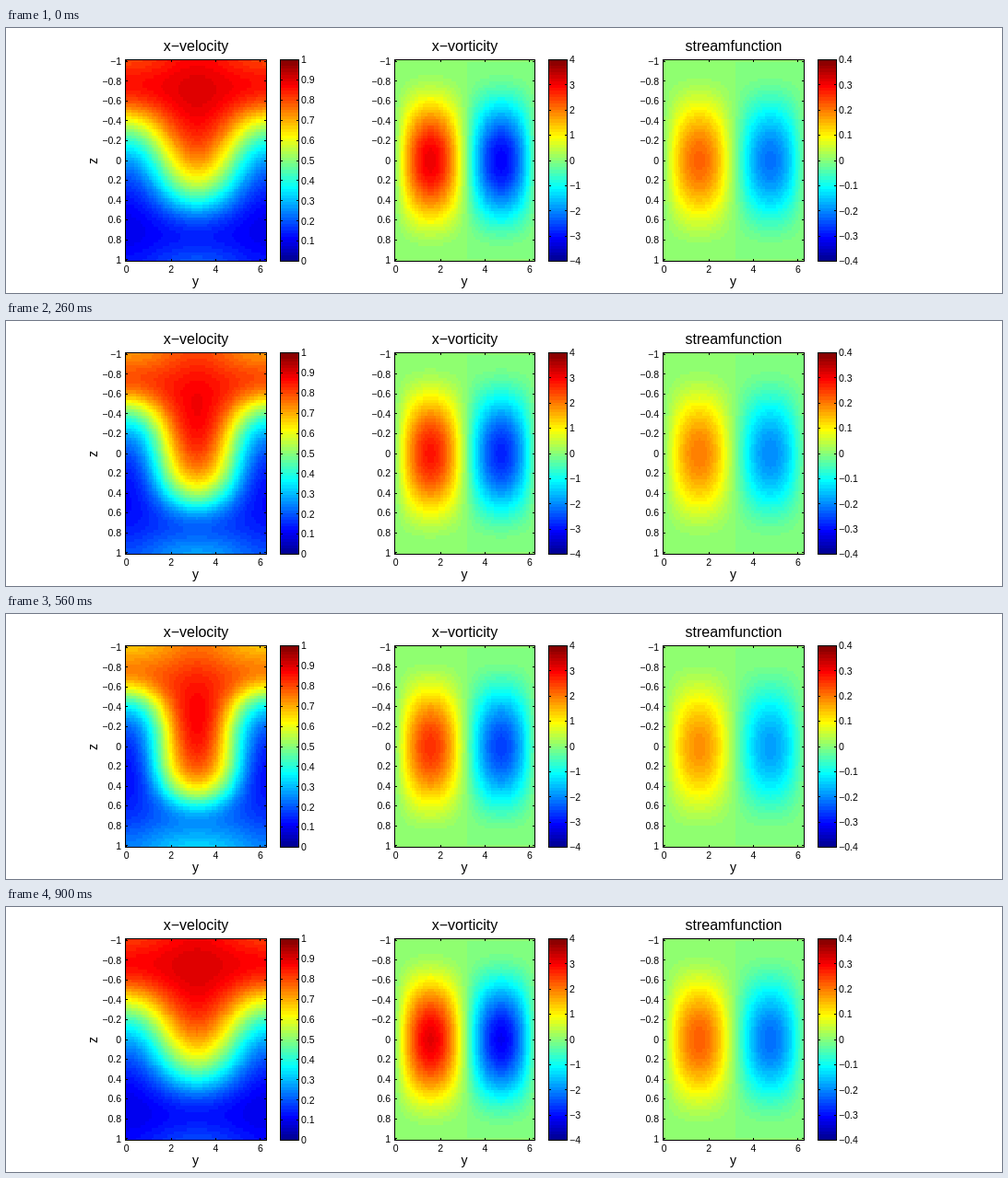
Recreate the animation shown at these times as an HTML page with a canvas. Size 1080 by 288 pixels, loop 920 ms.

```html
<!DOCTYPE html>
<html lang="en">
<head>
<meta charset="utf-8">
<title>Streamwise rolls and streaks</title>
<style>
  html, body { margin: 0; width: 100%; height: 100%; overflow: hidden; background: #fff; }
  canvas, svg { position: absolute; left: 0; top: 0; width: 1080px; height: 288px; }
  text { font-family: "Liberation Sans", Arial, Helvetica, sans-serif; font-size: 10.5px; fill: #000; }
  .title { font-size: 16px; }
  .label { font-size: 14px; }
  path { fill: none; stroke: #000; stroke-width: 1; shape-rendering: crispEdges; }
</style>
</head>
<body>
<canvas id="stage" width="1080" height="288"></canvas>
<svg id="axes" viewBox="0 0 1080 288"></svg>
<script>
const N = 64, STEPS = 27, LOOP = 920;
const TOP = 34, BOTTOM = 253, BAR = 20;
const { sin, cos, exp, pow, abs, floor, round, min, max, PI } = Math;
const ctx = document.getElementById('stage').getContext('2d');
const axes = document.getElementById('axes');
ctx.imageSmoothingEnabled = false;

const panels = [
  { x: 129, width: 153, bar: 297, title: 'x−velocity', lo: 0, hi: 1, step: 0.1, field: velocity },
  { x: 421, width: 152, bar: 588, title: 'x−vorticity', lo: -4, hi: 4, step: 1, field: roll(3.6) },
  { x: 712, width: 153, bar: 880, title: 'streamfunction', lo: -0.4, hi: 0.4, step: 0.1, field: roll(0.254) }
];

// Grid coordinates: y is periodic, z runs from wall to wall
const yAt = col => 2 * PI * col / N;
const zAt = row => 2 * row / (N - 1) - 1;
const decay = n => exp(-0.0122 * n);

function roll(amp) {
  return n => (col, row) =>
    amp * decay(n) * sin(yAt(col)) * pow(max(0, cos(PI * zAt(row) / 2)), 2.2);
}

// Streamwise velocity: a shear profile stirred by the rolls, damped at the walls
function flow(y, z) {
  return [-PI / 2 * sin(PI * z) * sin(y), -pow(cos(PI * z / 2), 2) * cos(y)];
}

function sample(u, y, z) {
  const gx = (y / (2 * PI) * N + N) % N;
  const gy = min(N - 1, max(0, (z + 1) / 2 * (N - 1)));
  const c0 = floor(gx), c1 = (c0 + 1) % N, r0 = min(N - 2, floor(gy));
  const fx = gx - c0, fy = gy - r0;
  const across = row => u[row * N + c0] * (1 - fx) + u[row * N + c1] * fx;
  return across(r0) * (1 - fy) + across(r0 + 1) * fy;
}

function advance(u, n) {
  const rate = 0.0288 * decay(n);
  const moved = u.map((_, k) => {
    const y = yAt(k % N), z = zAt(floor(k / N));
    const [v0, w0] = flow(y, z);
    const [v, w] = flow(y - v0 * rate / 2, z - w0 * rate / 2);
    const damp = 0.036 * pow(abs(z), 3) * (1 - 0.25 * z * cos(y));
    return 0.5 + (sample(u, y - v * rate, z - w * rate) - 0.5) * exp(-damp);
  });
  const mix = 0.0003 * pow((N - 1) / 2, 2);
  return moved.map((a, k) => {
    const above = k < N ? a : moved[k - N];
    const below = k >= N * (N - 1) ? a : moved[k + N];
    return a + mix * (above + below - 2 * a);
  });
}

const states = [Float64Array.from({ length: N * N }, (_, k) => 0.5 - 0.5 * sin(PI * zAt(floor(k / N)) / 2))];
for (let n = 0; n < STEPS; n++) states.push(advance(states[n], n));

function velocity(n) {
  return (col, row) => states[n][row * N + col];
}

// 64-level jet colour map
const jet = Array.from({ length: N }, (_, i) => {
  const k = i + 1;
  const level = v => round(255 * min(1, max(0, v / 16)));
  return [level(min(k - 24, 72 - k)), level(min(k - 8, 56 - k)), level(min(k + 8, 40 - k))];
});

const cell = document.createElement('canvas');
cell.width = cell.height = N;
const cellCtx = cell.getContext('2d');
const image = cellCtx.createImageData(N, N);

function paint(x, width, level) {
  for (let row = 0; row < N; row++) {
    for (let col = 0; col < N; col++) {
      const i = min(N - 1, max(0, floor(level(col, row))));
      image.data.set([...jet[i], 255], (row * N + col) * 4);
    }
  }
  cellCtx.putImageData(image, 0, 0);
  ctx.drawImage(cell, x, TOP, width, BOTTOM - TOP + 1);
}

function drawFields(n) {
  for (const p of panels) {
    const f = p.field(n);
    paint(p.x, p.width + 1, (col, row) => (f(col, row) - p.lo) / (p.hi - p.lo) * N + 1e-9);
  }
}

// Static axes
function add(tag, attrs, content) {
  const el = document.createElementNS('http://www.w3.org/2000/svg', tag);
  for (const k in attrs) el.setAttribute(k, attrs[k]);
  if (content !== undefined) el.textContent = content;
  axes.append(el);
}
function text(x, y, s, anchor, cls = '') {
  add('text', { x, y, 'text-anchor': anchor, class: cls }, s);
}
function box(x, width) {
  add('path', { d: `M${x + 0.5} ${TOP + 0.5}h${width}V${BOTTOM + 0.5}h${-width}Z` });
}
function sideTicks(x, width, y) {
  const py = round(y - 0.5) + 0.5;
  add('path', { d: `M${x} ${py}h3M${x + width + 1} ${py}h-3` });
}
const format = v => String(+v.toFixed(1)).replace('-', '−');

function drawAxes(p, first) {
  const mid = p.x + p.width / 2 + 0.5;
  box(p.x, p.width);
  text(mid, 25, p.title, 'middle', 'title');
  text(mid - 0.5, 280, 'y', 'middle', 'label');
  for (let i = -5; i <= 5; i++) {
    const y = 144 + i * 0.2 * 107.8;
    sideTicks(p.x, p.width, y);
    text(p.x - 4, y + 3.8, format(i * 0.2), 'end');
  }
  for (let v = 0; v <= 6; v += 2) {
    const x = p.x + 1.7 + v * 24.2, px = round(x - 0.5) + 0.5;
    add('path', { d: `M${px} ${TOP}v3M${px} ${BOTTOM + 1}v-3` });
    text(x, 266, format(v), 'middle');
  }
  if (first) {
    add('text', { transform: 'translate(99 144.5) rotate(-90)', 'text-anchor': 'middle', class: 'label' }, 'z');
  }

  paint(p.bar, BAR + 1, (col, row) => N - 1 - row);
  box(p.bar, BAR);
  const count = round((p.hi - p.lo) / p.step);
  for (let i = 0; i <= count; i++) {
    const y = BOTTOM + 0.5 - (BOTTOM - TOP) * i / count;
    sideTicks(p.bar, BAR, y);
    text(p.bar + BAR + 3, y + 3.8, format(p.lo + i * p.step), 'start');
  }
}

// Start times within the loop, and the simulation step shown from each
const starts = [0, 20, 60, 100, 120, 160, 200, 240, 260, 300, 340, 360, 400, 440,
  460, 500, 560, 600, 640, 680, 720, 760, 800, 820, 860, 900];
function stepAt(i) {
  if (i < 13) return 12 + i;
  if (i === 13) return 0;
  return i < 17 ? 11 + i : i - 14;
}

panels.forEach((p, i) => drawAxes(p, i === 0));
let shown = -1;
const begin = performance.now();
function tick() {
  const t = (performance.now() - begin) % LOOP;
  let i = starts.length - 1;
  while (starts[i] > t) i--;
  if (i !== shown) drawFields(stepAt(shown = i));
  requestAnimationFrame(tick);
}
tick();
</script>
</body>
</html>
```
